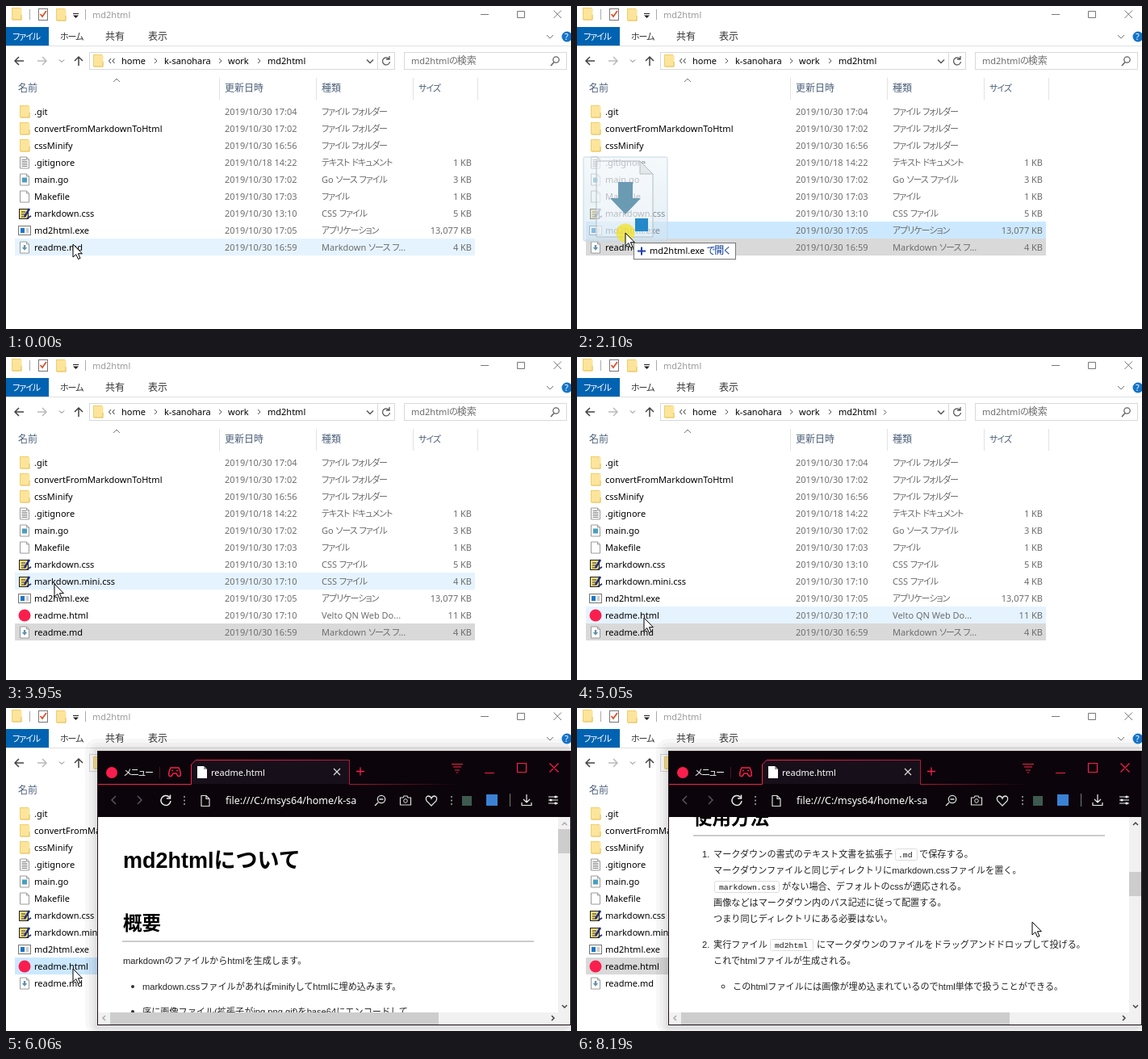
Write an HTML page that moves like this. It is 700 px wide and 400 px high and loops after 9430 ms.

```html
<!DOCTYPE html>
<html lang="ja">
<head>
<meta charset="utf-8">
<style>
html, body { margin: 0; width: 100%; height: 100%; overflow: hidden; background: #fff; }
svg { display: block; }
text { font: 11px 'Noto Sans', 'Noto Sans CJK JP', 'Noto Sans CJK', sans-serif; white-space: pre; }
.kana { font-size: 11px; letter-spacing: -1px; font-feature-settings: 'palt'; }
.kanji { font-size: 12px; }
.meta { fill: #6d6d6d; }
.head { fill: #4c607a; }
.page { font-family: 'Liberation Sans', 'Noto Sans CJK JP', 'Noto Sans CJK', sans-serif; font-size: 11.15px; fill: #222; }
.h1 { font-size: 27px; font-weight: bold; fill: #000; }
.h2 { font-size: 23.5px; font-weight: bold; fill: #000; }
.code { font: 9.75px 'Liberation Mono', monospace; fill: #111; }
.url { font-size: 12.5px; font-weight: 500; fill: #fff; }
.hint, .hint tspan { font-size: 11.9px; fill: #f2eff2; }
.nav { font-size: 11.8px; font-weight: 600; fill: #f4f4f4; }
.card { font-weight: 700; fill: #fff; }
.logo { font-size: 18.8px; font-weight: 700; font-style: italic; fill: #fff; }
.cal { font-size: 13.2px; font-weight: 700; fill: #fff; }
.bold { font-weight: 700; fill: #fff; }
</style>
</head>
<body>
<svg id="stage" width="700" height="400" viewBox="0 0 700 400"></svg>
<script>
const LOOP = 9430, RED = '#fa1e4e', USER = 'k-sanohara';

// ---------- drawing helpers ----------
const mix = s => s.replace(/[\u3040-\u30ff]+/g, m => `<tspan class="kana">${m}</tspan>`)
                  .replace(/[\u4e00-\u9fff]+/g, m => `<tspan class="kanji">${m}</tspan>`);
const text = (x, y, s, attrs = '') => `<text x="${x}" y="${y}" ${attrs}>${mix(s)}</text>`;
const plain = (x, y, s, cls = 'page') => `<text x="${x}" y="${y}" class="${cls}">${s}</text>`;
const rect = (x, y, w, h, fill, attrs = '') =>
  `<rect x="${x}" y="${y}" width="${w}" height="${h}" fill="${fill}" ${attrs}/>`;
const line = (d, stroke = '#555', w = 1, attrs = '') =>
  `<path d="${d}" fill="none" stroke="${stroke}" stroke-width="${w}" ${attrs}/>`;
const fill = (d, color, attrs = '') => `<path d="${d}" fill="${color}" ${attrs}/>`;
const dot = (x, y, r, color, attrs = '') => `<circle cx="${x}" cy="${y}" r="${r}" fill="${color}" ${attrs}/>`;
const group = (id, body, attrs = '') => `<g id="${id}" ${attrs}>${body}</g>`;
const at = (x, y, body) => `<g transform="translate(${x} ${y})">${body}</g>`;

const sheet = fill('M-5.5-7H2.5L5.5-4V7H-5.5Z', '#fff', 'stroke="#9a9a9a"') + line('M2.5-7V-4H5.5', '#9a9a9a');
const icons = {
  folder: fill('M-6-8H5V7H-6Z', '#f0cd6c') + fill('M-5-7H6.5V7.500H-5Z', '#fce59b') + line('M6 1V7H-5', '#e3bd55'),
  text: sheet + line('M-3.5-3.5H2M-3.5-1.5H3.5M-3.5.5H3.5M-3.5 2.5H3.5M-3.5 4.5H3.5', '#888'),
  blank: sheet,
  go: sheet + rect(-3, -2.5, 6, 6, '#4a9fc0'),
  css: rect(-6.5, -5.5, 11, 12, '#f6dc7a', 'stroke="#222"') + line('M-4-2H1M-4 1H1M-4 4H1', '#333') +
    line('M6-6L0 4', '#1d2f7a', 2.5) + line('M3 6L8 3', '#1d2f7a', 2),
  exe: rect(-7.5, -5.5, 15, 11, '#fff', 'stroke="#777"') + rect(-5, -3, 5, 6, '#1b78c8') + line('M2-2H5M2 0H5M2 2H5', '#999'),
  html: dot(0, 0, 7.5, RED),
  md: sheet + fill('M-1.2-3H1.2V0H3.2L0 3.8L-3.2 0H-1.2Z', '#5d93b0'),
};

// ---------- file manager ----------
const files = [
  ['folder', '.git', '30 17:04', 'ファイル フォルダー', ''],
  ['folder', 'convertFromMarkdownToHtml', '30 17:02', 'ファイル フォルダー', ''],
  ['folder', 'cssMinify', '30 16:56', 'ファイル フォルダー', ''],
  ['text', '.gitignore', '18 14:22', 'テキスト ドキュメント', '1 KB'],
  ['go', 'main.go', '30 17:02', 'Go ソース ファイル', '3 KB'],
  ['blank', 'Makefile', '30 17:03', 'ファイル', '1 KB'],
  ['css', 'markdown.css', '30 13:10', 'CSS ファイル', '5 KB'],
  ['css', 'markdown.mini.css', '30 17:10', 'CSS ファイル', '4 KB', true],
  ['exe', 'md2html.exe', '30 17:05', 'アプリケーション', '13,077 KB'],
  ['html', 'readme.html', '30 17:10', 'Velto QN Web Do...', '11 KB', true],
  ['md', 'readme.md', '30 16:59', 'Markdown ソース フ...', '4 KB'],
];
const rowY = i => 131 + 21 * i;
const rowAt = y => Math.round((y - 131.5) / 21);
const list = rows => rows.map(([icon, name, date, type, size], i) => {
  const y = rowY(i) + 4;
  return at(23, rowY(i), icons[icon]) + text(35, y, name) + text(271, y, '2019/10/' + date, 'class="meta"') +
    text(391, y, type, 'class="meta"') + text(577, y, size, 'class="meta" text-anchor="end"');
}).join('');

const chevron = (x, y) => line(`M${x - 2} ${y - 3}l3 3l-3 3`, '#555');
const explorer =
  at(13, 10, icons.folder) + line('M29.5 4V17M98.5 4V17', '#aaa') +
  rect(40.5, 3.5, 11, 14, '#fff', 'stroke="#777"') + line('M42.5 10L45 13L50 6', '#d9532c', 1.8) +
  at(68, 11, icons.folder) + line('M83 9.5H90', '#222') + fill('M83 11.5H90L86.5 15Z', '#222') +
  group('caption', text(107, 15, 'md2html') +
    '<path d="M588 10.5H598M633.5 6.5H642.5V14.5H633.5ZM678.5 5.5L688 15M688 5.5L678.5 15" fill="none" stroke="currentColor"/>') +
  rect(0, 26, 53, 23, '#0063b1') + text(8, 42, 'ファイル', 'fill="#fff"') +
  text(67, 42, 'ホーム', 'fill="#333"') + text(123, 42, '共有', 'fill="#333"') + text(176, 42, '表示', 'fill="#333"') +
  line('M0 49.5H700', '#dfe0e1') + line('M670 36L674 40L678 36', '#777') +
  dot(695, 38, 6.5, '#1473c8') + text(692, 42, '?', 'fill="#fff" font-weight="700"') +
  line('M22 68H11M16 63L11 68L16 73', '#444', 1.5) + line('M39 68H50M45 63L50 68L45 73', '#bbb', 1.5) +
  line('M66 66.5L69 69.5L72 66.5', '#777') + line('M90 74V63M85 68L90 63L95 68', '#444', 1.5) +
  rect(103.5, 57.5, 378, 21, '#fff', 'stroke="#d9d9d9"') + line('M460.5 58V78', '#d9d9d9') +
  at(114, 68, icons.folder) + line('M130 65L127.5 68L130 71M134.5 65L132 68L134.5 71', '#333') +
  text(143, 72, 'home') + chevron(186, 68) + text(196, 72, USER) + chevron(266, 68) +
  text(275, 72, 'work') + chevron(314, 68) + text(324, 72, 'md2html') +
  group('crumb', chevron(382, 68.5)) +
  line('M447 66.5L451 70.5L455 66.5', '#555', 1.4) +
  line('M474.5 65.5A4.5 4.5 0 1 0 475.5 69M475 62V66H471', '#555', 1.3) +
  rect(493.5, 57.5, 201, 21, '#fff', 'stroke="#d9d9d9"') + text(502, 72, 'md2htmlの検索', 'class="meta"') +
  dot(681.5, 66.5, 3.7, 'none', 'stroke="#666" stroke-width="1.3"') + line('M679 69.5L675 74', '#666', 1.6) +
  line('M264.5 89V116M384.5 89V116M504.5 89V116M584.5 89V116', '#e2e2e2') +
  line('M133 94L137 90L141 94', '#777') +
  [[15, '名前'], [271, '更新日時'], [391, '種類'], [511, 'サイズ']].map(([x, s]) => text(x, 106, s, 'class="head"')).join('') +
  rect(11, 0, 570, 21, '#d9d9d9', 'id="picked"') + rect(11, 0, 570, 21, '#e5f3ff', 'id="hover"') +
  group('before', list(files.filter(f => !f[5]))) + group('after', list(files));

// ---------- drag image, console ----------
const ghost =
  rect(0, 0, 104, 104, 'url(#glass)', 'rx="2" stroke="#c4d8e4"') +
  fill('M16 5H70L86 21V99H16Z', '#f5f8fa', 'fill-opacity=".45" stroke="#b4bcc2"') +
  fill('M70 5V21H86Z', '#e3e8eb', 'stroke="#b4bcc2"') +
  fill('M43 31H61V51H71L52 71L33 51H43Z', '#6b9ab3') + rect(64, 76, 16, 16, '#2489ca');
const tip = rect(.5, .5, 126, 20, '#fff', 'stroke="#767676"') + line('M10 5.5V15.5M5 10.5H15', '#1c3fb0', 2) +
  text(20, 14, 'md2html.exe') + text(91, 14, 'で開く', 'fill="#003399"');
const shell = rect(-5, -5, 658, 385, '#000', 'rx="8" opacity=".06"') + rect(-1, -1, 639, 366, '#fff', 'stroke="#777"') +
  rect(0, 18, 622, 330, '#000') +
  text(0, 8, `64¥home¥${USER}¥work¥md2html¥md2html.exe`, 'fill="#444"') +
  line('M553 4.5H562M587 0H595V8H587ZM617 0L625 8M625 0L617 8M626 27L630 23L634 27M626 354L630 358L634 354M612 353L616 357L612 361', '#555');

// ---------- browser ----------
let seed = 7;
const rnd = () => (seed = seed * 16807 % 2147483647) / 2147483647;
const embers = Array.from({ length: 36 }, () => {
  const x = 240 + rnd() * 440, y = 140 + rnd() * 245, n = 1 + rnd() * 4;
  return line(`M${x} ${y}l${n} ${n * .4}`, RED, .6 + rnd(), `opacity="${.2 + rnd() * .6}"`);
}).join('');
const cardBox = (x, color, bg) => fill(`M${x}.5 391V324L${x + 13} 310.5H${x + 102}V391`, bg, `stroke="${color}"`);
const navTabs = [[257, 'ALL'], [290, 'TV'], [315, 'DESK'], [360, 'MOBILE'], [418, 'BROWSER'], [493, 'WEB'], [533, 'CLOUD']];
const start =
  rect(114, 135, 585, 257, '#0b040a') +
  fill('M232 205L300 194L400 200L470 225L560 262L620 310L680 391H190L215 340L240 290Z', 'url(#glow)') + embers +
  plain(258, 184, 'TQ Lounge', 'logo') + rect(366, 167, 73, 20, RED, 'rx="2"') + text(370, 181, 'フィードバック', 'class="bold"') +
  navTabs.map(([x, s]) => plain(x, 235, s, 'nav')).join('') + rect(416, 240, 67, 2, RED) +
  dot(545, 231, 5, 'none', 'stroke="#ddd" stroke-dasharray="4 3"') +
  plain(257, 290, 'RELEASE CALENDAR', 'cal') +
  cardBox(257, RED, '#4a0818') + cardBox(376, '#eee', 'url(#shade)') +
  `<g clip-path="url(#rail)">${cardBox(496, '#eee', 'url(#shade)')}</g>` +
  plain(384, 343, 'Lunar Town Cats', 'card') + plain(504, 343, 'Lantern on', 'card') + plain(504, 359, 'Hill', 'card') +
  line('M581 377L589 385L581 393', '#bbb', 2.5) + fill('M266 391A6 6 0 0 1 278 391Z', RED) + rect(689, 136, 8, 11, '#3d363c', 'rx="4"');

const kbd = (x, y, w, s, tx) => rect(x + .5, y - 10.5, w, 14, '#fff', 'rx="2" stroke="#ddd"') + plain(tx, y, s, 'code');
const END = 427;
const article =
  plain(145, 198, 'md2htmlについて', 'page h1') + plain(145, 275, '概要', 'page h2') + rect(144, 288, 510, 2, '#ccc') +
  plain(145, 317, 'markdownのファイルからhtmlを生成します。') +
  ['markdown.cssファイルがあればminifyしてhtmlに埋め込みます。', '序に画像ファイル(拡張子がjpg,png,gif)をbase64にエンコードして',
   '生成されたhtmlは単体で閲覧できます。', '出力先は元のファイルと同じ場所になります。']
    .map((s, i) => { const y = [345, 376, 427, 458][i]; return dot(157, y, 2, '#333') + plain(169, y + 4, s); }).join('') +
  plain(169, 400, 'htmlに埋め込みます。') +
  at(0, END,
    plain(144, 144, '使用方法', 'page h2') + rect(144, 157, 510, 2, '#ccc') +
    plain(155, 185, '1.') + plain(169, 185, 'マークダウンの書式のテキスト文書を拡張子') + kbd(394, 185, 27, '.md', 398) + plain(424, 185, 'で保存する。') +
    plain(169, 205, 'マークダウンファイルと同じディレクトリにmarkdown.cssファイルを置く。') +
    kbd(170, 225, 80, 'markdown.css', 176) + plain(254, 225, 'がない場合、デフォルトのcssが適応される。') +
    plain(169, 245, '画像などはマークダウン内のパス記述に従って配置する。') +
    plain(169, 265, 'つまり同じディレクトリにある必要はない。') +
    plain(155, 297, '2.') + plain(169, 297, '実行ファイル') + kbd(239, 297, 53, 'md2html', 245) +
    plain(297, 297, 'にマークダウンのファイルをドラッグアンドドロップして投げる。') +
    plain(169, 317, 'これでhtmlファイルが生成される。') +
    dot(181, 345, 2, 'none', 'stroke="#333"') + plain(193, 349, 'このhtmlファイルには画像が埋め込まれているのでhtml単体で扱うことができる。'));
const reader = rect(114, 135, 585, 257, '#fff') +
  `<g clip-path="url(#view)">${group('article', article)}</g>` +
  rect(684, 135, 15, 242, '#f1f1f1') + rect(684, 150, 15, 30, '#cdcdcd', 'id="thumb"') +
  rect(114, 377, 585, 15, '#f1f1f1') + rect(129, 377, 407, 15, '#cdcdcd') +
  group('up', '<path d="M689 145L692 142L695 145" fill="none" stroke="currentColor" stroke-width="1.5"/>') +
  line('M123 381L120 384L123 387', '#aaa', 1.5) +
  line('M689 368L692 371L695 368M676 381L679 384L676 387', '#444', 1.5);

const dots = x => [110, 114.5, 119].map(y => dot(x, y, 1, '#aaa')).join('');
const camera = x => line(`M${x - 6.5} 111H${x - 3}L${x - 2} 109H${x + 2}L${x + 3} 111H${x + 6.5}V120H${x - 6.5}Z`, '#ddd', 1.2) + dot(x, 115, 2.3, 'none', 'stroke="#ddd"');
const plus = x => line(`M${x - 5} 78.5H${x + 5}M${x} 73.5V83.5`, RED, 1.3);
const pad = line('M204 74H214Q217 80 216 84Q213 86 211 81H207Q205 86 202 84Q201 80 204 74Z', RED, 1.5) + dot(206, 77.5, 1, RED) + dot(212, 77.5, 1, RED);
const shadow = [15, 10, 6, 3].map(d => rect(113 - d, 53 - d, 600, 343 + d * 1.5, '#000', `rx="${d}" opacity=".03"`)).join('');
const chrome =
  shadow + rect(113, 53, 587, 340, '#0b040a') +
  dot(131, 80, 7, RED) + text(146, 84, 'メニュー', 'fill="#fff"') +
  line('M552 69.5H566M554 73H564M556 77H562M558 80H560', RED, 1.2) +
  line('M593 80.5H605M633.5 68.5H644.5V79.5H633.5ZM673.5 68.5L684.5 79.5M684.5 68.5L673.5 79.5', RED, 1.2) +
  line('M136 109L131 114L136 119M163 109L168 114L163 119', '#5f585f', 1.4) +
  line('M202.5 110.5A6 6 0 1 0 204 115M203.5 107.5V112H199', '#eee', 1.5) + dots(221) + dots(552) +
  rect(565, 109, 12, 12, '#3e5a50') + rect(595, 107, 14, 14, '#3b82d6') + line('M624.5 106V122', '#777') +
  line('M645 107V117M641 113L645 117L649 113M639 117V120.5H651V117M672 110H684M672 114H684M672 118H684', '#eee', 1.2) +
  dot(681, 110, 1.6, '#fff') + dot(675, 114, 1.6, '#fff') + dot(681, 118, 1.6, '#fff') + pad;
const startBar = line('M114 94.5H190.5V70L196 64.5H227.5V94.5H430', 'url(#fade)') + plus(241) +
  dot(247, 115, 7, RED) + text(272, 119, '検索キーワードあるいはウェブアドレスを入力', 'class="hint"') + camera(527);
const readBar = fill('M229.5 94V70L235 64.5H425.5V94Z', '#17101a') +
  line('M114 94.5H229.5V70L235 64.5H425.5V94.5H560', 'url(#fade)') +
  line('M190.5 73V87', '#4a1424') +
  fill('M237 72H245L249 76V87H237Z', '#fff') + fill('M245 72V76H249Z', '#999') + text(254, 84, 'readme.html', 'fill="#fff"') +
  line('M406 75L414 83M414 75L406 83', '#ddd', 1.2) + plus(439) +
  line('M242 108.5H248L252 112.5V121.5H242ZM248 108.5V112.5H252', '#ddd', 1.2) +
  plain(272, 119, 'file:///C:/msys64/home/' + USER.slice(0, 4), 'url') +
  dot(465, 113, 4.7, 'none', 'stroke="#ddd" stroke-width="1.3"') + line('M462.5 113H467.5M461 117L457 121', '#ddd', 1.4) + camera(495) +
  line('M527 121L521 115Q519 110 523 109Q526 109 527 112Q528 109 531 109Q535 110 533 115Z', '#ddd', 1.3);

document.getElementById('stage').innerHTML = `<defs>
  <linearGradient id="glass" x2="0" y2="1"><stop stop-color="#eef5f9" stop-opacity=".6"/><stop offset="1" stop-color="#cfe3ef" stop-opacity=".6"/></linearGradient>
  <linearGradient id="fade" gradientUnits="userSpaceOnUse" x1="114" x2="560" y1="0" y2="0">
    <stop stop-color="${RED}"/><stop offset=".3" stop-color="${RED}"/><stop offset=".7" stop-color="${RED}" stop-opacity=".7"/><stop offset="1" stop-color="${RED}" stop-opacity="0"/></linearGradient>
  <linearGradient id="glow"><stop stop-color="#1d0610"/><stop offset=".25" stop-color="#300713"/><stop offset=".6" stop-color="#290611"/><stop offset="1" stop-color="#12050c"/></linearGradient>
  <linearGradient id="shade" x2="0" y2="1"><stop stop-color="#22060f"/><stop offset="1" stop-color="#350815"/></linearGradient>
  <clipPath id="view"><rect x="114" y="135" width="570" height="242"/></clipPath>
  <clipPath id="rail"><rect x="490" y="300" width="67" height="91"/></clipPath></defs>` +
  rect(0, 0, 700, 400, '#fff') + explorer + group('shell', shell) +
  group('browser', chrome + group('start', startBar + start) + group('reader', readBar + reader) +
    rect(113.5, 53.5, 586, 339, 'none', 'stroke="#1c1219"')) +
  group('ghost', ghost) + dot(0, 0, 11.5, '#f5e21c', 'id="press" fill-opacity=".72"') + group('tip', tip) +
  group('arrow', fill('M0 0V16L3.8 12.6L6.5 18.5L9 17.4L6.4 11.7H11.4Z', '#fff', 'stroke="#000"')) +
  group('beam', line('M-3-7.5H-1L0-6.5L1-7.5H3M0-6.5V6.5M-3 7.5H-1L0 6.5L1 7.5H3', '#222', 1.2));

// ---------- motion ----------
const $ = Object.fromEntries([...document.querySelectorAll('g[id], rect[id], circle[id]')].map(e => [e.id, e]));
const show = (el, on) => el.setAttribute('display', on ? 'inline' : 'none');
const place = (el, x, y) => el.setAttribute('transform', `translate(${x} ${y})`);
const smooth = p => p * p * (3 - 2 * p);
// Progress from 0 to 1 in n jumps, the first at a and the last at b.
const stepped = (t, a, b, n) => t < a ? 0 : Math.min(1, (Math.floor((t - a) * (n - 1) / (b - a) + .02) + 1) / n);

const moves = [
  [1630, 1780, 3, 71, 289], [1950, 2100, 3, 60, 281], [4580, 5050, 7, 83, 323],
  [6380, 6770, 6, 569, 264], [7640, 7790, 3, 564, 265],
];
const pointer = t => moves.reduce(([x, y], [a, b, n, tx, ty]) => {
  const p = smooth(stepped(t, a, b, n));
  return [x + (tx - x) * p, y + (ty - y) * p];
}, [83, 295]);
const scrolled = t => 107 * stepped(t, 7090, 7170, 2) + 213 * stepped(t, 7640, 7790, 3) + (t >= 8190 ? 107 : 0);

function mark(el, row, color) {
  show(el, row >= 0);
  el.setAttribute('y', rowY(row) - 11);
  el.setAttribute('fill', color);
}

function render(t) {
  const within = (a, b) => t >= a && t < b;
  const [x, y] = pointer(t);
  const grown = t >= 3950, dragging = within(1630, 2790), dropping = within(1780, 2790);

  const active = within(5210, 5900);
  $.caption.setAttribute('fill', active ? '#000' : '#999');
  $.caption.setAttribute('color', active ? '#000' : '#777');
  show($.crumb, t >= 4260);
  show($.before, !grown);
  show($.after, grown);

  const picked = t < 1320 ? -1 : t < 3950 ? 8 : t < 5210 ? 10 : 9;
  mark($.picked, picked, within(1320, 1630) || within(5210, 6450) ? '#cce8ff' : '#d9d9d9');
  const hover = dropping ? 7 : within(1320, 2960) || t >= 5210 ? -1 : rowAt(y);
  mark($.hover, hover, dropping ? '#cce8ff' : '#e5f3ff');

  show($.ghost, dragging);
  place($.ghost, x - 52, y - 94);
  show($.tip, dropping);
  place($.tip, x + 10, y + 12);
  show($.press, within(1320, 2790) || within(5210, 5590));
  place($.press, x, y);
  $.press.setAttribute('opacity', within(5510, 5590) ? .5 : 1);

  show($.shell, within(2790, 2960));
  $.shell.setAttribute('opacity', t < 2870 ? .4 : .17);

  show($.browser, t >= 5740);
  $.browser.setAttribute('opacity', t < 5820 ? .6 : 1);
  show($.start, t < 5900);
  show($.reader, t >= 5900);
  show($.article, t >= 5980);
  const scroll = scrolled(t);
  place($.article, 0, -scroll);
  $.thumb.setAttribute('y', 150 + scroll * 53 / END);
  $.up.setAttribute('color', scroll ? '#444' : '#aaa');

  const beam = within(6770, 7640);
  show($.beam, beam);
  show($.arrow, !beam);
  place(beam ? $.beam : $.arrow, x, y);
}

const began = performance.now();
(function tick() {
  render((performance.now() - began) % LOOP);
  requestAnimationFrame(tick);
})();
</script>
</body>
</html>
```
